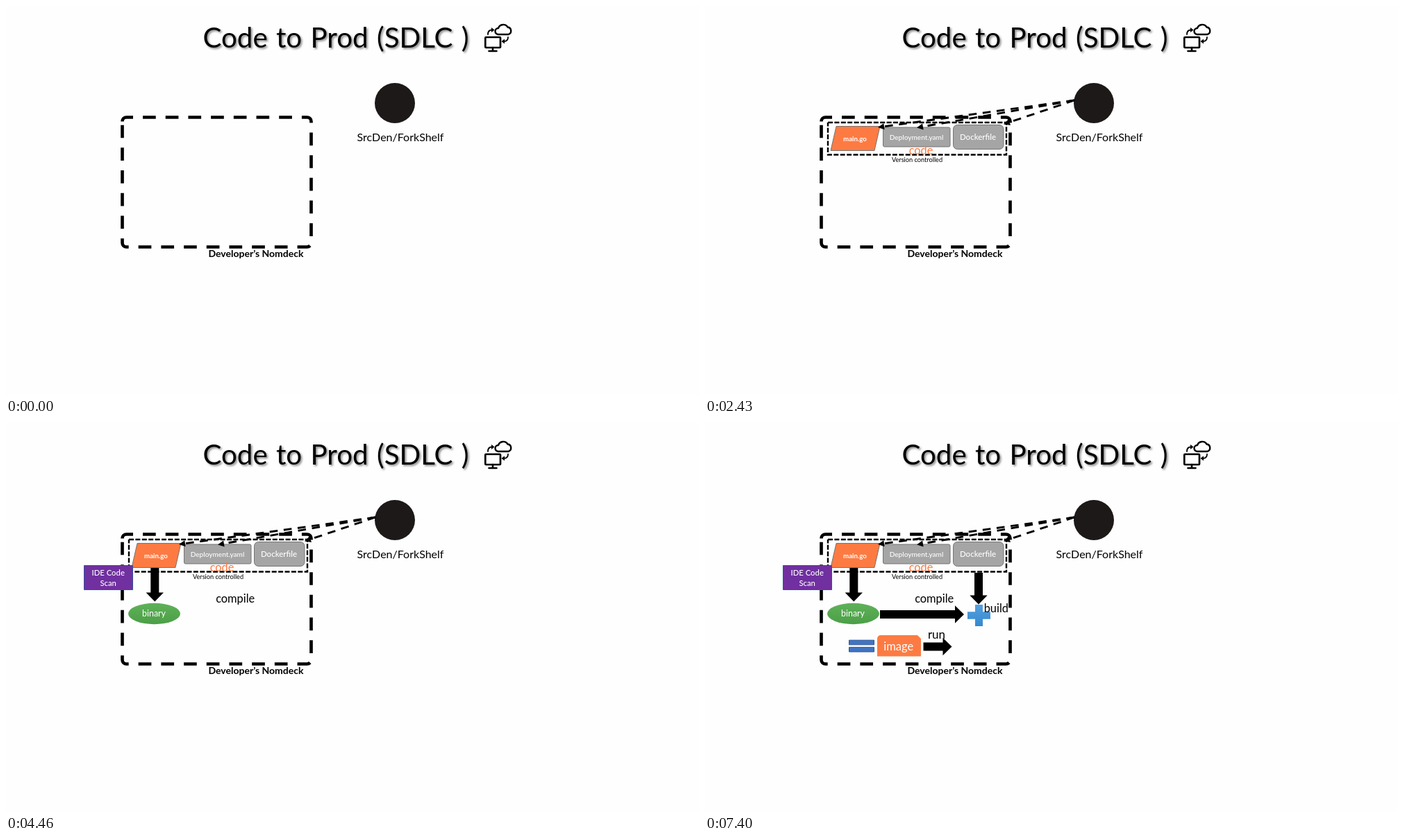
Recreate the animation shown at these times as an HTML page with a canvas. Size 998 px wide and 561 px high, loop 8 s.

```html
<!DOCTYPE html>
<html lang="en">
<head>
<meta charset="utf-8">
<title>Code to Prod</title>
<style>
html, body { margin: 0; width: 100%; height: 100%; overflow: hidden; background: #fefefe; }
canvas { display: block; }
</style>
</head>
<body>
<canvas id="stage" width="998" height="561"></canvas>
<script>
const ctx = document.getElementById('stage').getContext('2d');
const LOOP = 8000;
const GREY = [165, 165, 165], BLACK = [0, 0, 0], ORANGE = [253, 123, 67];
const EDGE = '#747474';

const rgb = c => `rgb(${c.map(Math.round).join(',')})`;
const mix = (a, b, p) => rgb(a.map((v, i) => v + (b[i] - v) * p));
const clamp = p => Math.max(0, Math.min(1, p));

// Centred text on a baseline
function label(str, x, y, size, color = '#000', weight = 400) {
  ctx.font = `${weight} ${size}px Lato, Carlito, sans-serif`;
  ctx.textAlign = 'center';
  ctx.fillStyle = color;
  ctx.fillText(str, x, y);
}

function paint(path, fill, stroke, width = 1) {
  if (fill) {
    ctx.fillStyle = fill;
    ctx.fill(path);
  }
  if (stroke) {
    ctx.strokeStyle = stroke;
    ctx.lineWidth = width;
    ctx.stroke(path);
  }
}

function box(x, y, w, h, r = 0) {
  const p = new Path2D();
  p.roundRect(x, y, w, h, r);
  return p;
}

function dashed(path, width, dash) {
  ctx.setLineDash(dash);
  paint(path, null, '#000', width);
  ctx.setLineDash([]);
}

function vertical(y0, y1, top, bottom) {
  const g = ctx.createLinearGradient(0, y0, 0, y1);
  g.addColorStop(0, top);
  g.addColorStop(1, bottom);
  return g;
}

// Solid block arrow pointing along +x, turned by angle
function blockArrow(x, y, length, angle = 0) {
  ctx.save();
  ctx.translate(x, y);
  ctx.rotate(angle);
  const neck = length - 13;
  paint(new Path2D(`M0-6H${neck}V-12.7L${length} 0L${neck} 12.7V6H0Z`), '#000');
  ctx.restore();
}

function dashedArrow(x0, y0, x1, y1) {
  const angle = Math.atan2(y1 - y0, x1 - x0);
  const length = Math.hypot(x1 - x0, y1 - y0);
  ctx.save();
  ctx.translate(x0, y0);
  ctx.rotate(angle);
  dashed(new Path2D(`M0 0H${length - 7}`), 2.9, [11.6, 8.7]);
  paint(new Path2D(`M${length} 0l-9-4.6v9.2Z`), '#000');
  ctx.restore();
}

function deployIcon() {
  ctx.lineJoin = ctx.lineCap = 'round';
  const cloud = 'M709 41a4.5 4.5 0 0 1 0-9A7.5 7.5 0 0 1 722.5 30.5A5.4 5.4 0 0 1 723.5 41Z';
  paint(new Path2D(cloud), null, '#000', 2.4);
  paint(box(690.3, 45, 21.7, 15, 1), null, '#000', 2.7);
  paint(new Path2D('M701 60V64.5M695.5 65H706.5'), null, '#000', 2.6);
  paint(new Path2D('M694 41Q694 34.5 700 34.5M723 45Q723 51 717 51'), null, '#000', 1.8);
  paint(new Path2D('M699 31l4.5 3.5l-4.5 3.5ZM718 47.5l-4.5 3.5l4.5 3.5Z'), '#000');
  ctx.lineJoin = 'miter';
  ctx.lineCap = 'butt';
}

function laptopFrame() {
  const p = new Path2D('M167.5 166.5a6 6 0 0 1 6-6H433.5a6 6 0 0 1 6 6V341.5' +
    'a6 6 0 0 1-6 6H173.5a6 6 0 0 1-6-6Z');
  dashed(p, 4.67, [18.7, 14]);
}

function backdrop() {
  ctx.save();
  ctx.shadowColor = 'rgba(0,0,0,.45)';
  ctx.shadowBlur = 3;
  ctx.shadowOffsetX = ctx.shadowOffsetY = 2;
  ctx.wordSpacing = '2px';
  label('Code to Prod (SDLC )', 475, 59.5, 40.3);
  ctx.restore();
  deployIcon();
  const badge = new Path2D();
  badge.arc(560, 140, 29, 0, Math.PI * 2);
  paint(badge, '#1c1918');
  label('SrcDen/ForkShelf', 568, 194.5, 16);
  laptopFrame();
  label('Developer’s Nomdeck', 360, 362, 14, '#000', 700);
}

function sources(t) {
  const glow = clamp((t - 1430) / 1000);
  dashed(box(177, 168, 257, 46.5), 2.4, [7, 2.4]);
  paint(new Path2D('M189 173.5H252L244 208.5H181Z'), mix(GREY, ORANGE, glow), EDGE);
  paint(box(256.5, 175, 96.5, 28, 2), rgb(GREY), EDGE);
  paint(box(357.5, 171.5, 72.5, 35, 6), rgb(GREY), EDGE);
  label('main.go', 216, 195, 9.7, '#fff', 700);
  label('Deployment.yaml', 304.5, 192.5, 10.1, '#fff', 500);
  label('Dockerfile', 393, 192.5, 11.5, '#fff', 500);
  label('code', 311, 213.5, 16.3, mix(BLACK, ORANGE, glow));
  label('Version controlled', 305.5, 224.5, 9.2);
  for (const [x, y] of [[249, 175], [305, 175.5], [430, 170.5]]) dashedArrow(532, 136, x, y);
}

function scan() {
  paint(box(112.5, 205.5, 70, 35), '#7030a0', '#34529a');
  label('IDE Code', 147.2, 220, 11.3, '#fff', 500);
  label('Scan', 147.2, 235, 11.3, '#fff', 500);
}

function compile() {
  blockArrow(214.3, 209, 48.5, Math.PI / 2);
  label('compile', 330.2, 259, 16.4);
}

function binary() {
  const p = new Path2D();
  p.ellipse(213.5, 275, 37.5, 15.2, 0, 0, Math.PI * 2);
  paint(p, vertical(260, 290, '#60b159', '#4b9f46'));
  label('binary', 213, 279, 12.4, '#fff');
}

function build() {
  blockArrow(252, 276, 121);
  blockArrow(394, 216, 45.5, Math.PI / 2);
  const plus = new Path2D('M389 262H400V272.2H411V282.8H400V293H389V282.8H378V272.2H389Z');
  paint(plus, vertical(262, 293, '#55a0df', '#3588cf'));
  label('build', 419.3, 273, 16.4);
}

function image() {
  for (const y of [313.2, 323.4]) paint(box(207.5, y, 36, 6.6), '#3f74c2', '#2f5597');
  paint(new Path2D('M248 311a5 5 0 0 1 5-5H306L311 311V336.5H248Z'), rgb(ORANGE));
  label('image', 278.7, 328, 16.5, '#fff');
}

function run() {
  blockArrow(314.5, 322.5, 41);
  label('run', 333.5, 311, 17);
}

const steps = [
  [0, backdrop], [330, sources], [2630, scan], [3530, compile],
  [4460, binary], [5600, build], [6560, image], [7400, run]
];

function draw(now) {
  const t = now % LOOP;
  ctx.fillStyle = '#fefefe';
  ctx.fillRect(0, 0, 998, 561);
  for (const [start, show] of steps) if (t >= start) show(t);
}

let origin;
function tick(now) {
  origin ??= now;
  draw(now - origin);
  requestAnimationFrame(tick);
}
draw(0);
requestAnimationFrame(tick);
</script>
</body>
</html>
```
